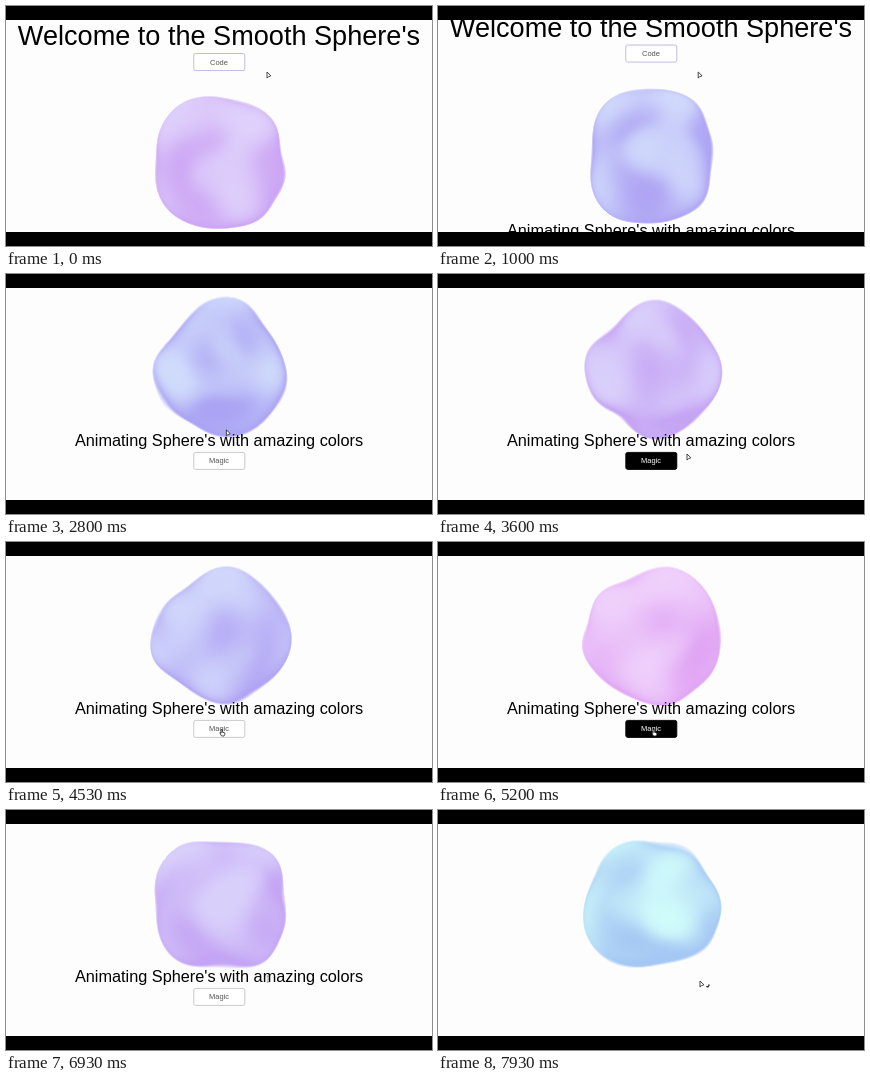
An HTML page with a canvas for the animation above (8000 ms loop, 426 by 240 pixels).

```html
<!DOCTYPE html>
<html lang="en">
<head>
<meta charset="utf-8">
<title>Smooth Spheres</title>
<style>
  html, body { margin: 0; width: 100%; height: 100%; overflow: hidden; background: #fdfdfd; }
  svg, canvas { position: absolute; left: 0; top: 0; display: block; }
  svg { width: 100%; height: 100%; }
  canvas { width: calc(100vw * 160 / 426); height: calc(100vw * 160 / 426); }
  text { font-family: "Liberation Sans", Arial, sans-serif; text-anchor: middle; }
  .btn text { font-size: 7.5px; }
</style>
</head>
<body>
<canvas id="sphere" width="160" height="160"></canvas>
<svg viewBox="0 0 426 240">
  <g id="hero">
    <text x="213" y="39" font-size="27.1">Welcome to the Smooth Sphere's</text>
    <g class="btn">
      <rect x="187.8" y="47.5" width="51" height="17" rx="1.8" fill="#fff" stroke="#bbb6e2" stroke-width=".9"/>
      <text x="213" y="58.5" fill="#555">Code</text>
    </g>
  </g>
  <g id="caption">
    <text x="213" y="172.2" font-size="16.3">Animating Sphere's with amazing colors</text>
    <g class="btn">
      <rect id="face" x="187.8" y="178.4" width="51" height="17" rx="1.8" stroke-width=".9"/>
      <text id="label" x="213" y="189.3">Magic</text>
    </g>
  </g>
  <path d="M0 0h426v14H0zM0 226h426v14H0z"/>
  <g id="pointer" stroke-linejoin="round">
    <path id="arrow" d="M0 0v6l1.5-1.3 2.4-.9z" fill="#fff" stroke="#333" stroke-width=".9"/>
    <path id="busy" d="M6.4 5.2a1.3 1.3 0 0 0 2.2-1.8" fill="none" stroke="#333" stroke-width="1.3"/>
    <path id="hand" d="M-.9-2.5v3.6l-1.2-.4.9 2.3 1 1h2.2l.8-1.4V.9L.4.2v-2.7z" fill="#fff" stroke="#222" stroke-width=".8"/>
    <path id="beam" d="M-1.3-1h2.6M0-1v6M-1.3 5h2.6" stroke="#777" stroke-width=".7"/>
  </g>
</svg>
<script>
const LOOP = 8000, RELOAD = 7500;
const SIZE = 160, RADIUS = 65.5, BUMP = 0.115, BOUND = 1 + BUMP;
const $ = id => document.getElementById(id);
const ctx = $("sphere").getContext("2d");
const pixels = ctx.createImageData(SIZE, SIZE);

const hues = [[0, 270], [2000, 225], [3600, 265], [4530, 250], [5800, 315], [6930, 264], [7930, 214]];
const trail = [
  [900, 261, 66], [1900, 233, 66], [2400, 233, 66], [3000, 216, 187], [3600, 249, 180],
  [4450, 216, 190], [6200, 216, 190], [6930, 262, 167], [7930, 262, 171]
];

const clamp = v => Math.min(1, Math.max(0, v));
const ramp = (t, from, to) => clamp((t - from) / (to - from));
const smooth = u => u * u * (3 - 2 * u);
const mix = (a, b, u) => a + (b - a) * u;
const show = (el, on) => el.setAttribute("visibility", on ? "visible" : "hidden");
const move = (el, x, y) => el.setAttribute("transform", `translate(${x} ${y})`);

// Eased values at time t from rows of [time, ...values]
function follow(keys, t) {
  let i = 0;
  while (i < keys.length - 2 && t >= keys[i + 1][0]) i++;
  const [a, b] = [keys[i], keys[i + 1]];
  const u = smooth(ramp(t, a[0], b[0]));
  return a.slice(1).map((v, k) => mix(v, b[k + 1], u));
}

function hsl(h, s, l) {
  const a = s * Math.min(l, 1 - l);
  return [0, 8, 4].map(n => {
    const k = (n + h / 30) % 12;
    return 255 * (l - a * Math.max(-1, Math.min(k - 3, 9 - k, 1)));
  });
}

// Warped waves over the unit sphere, from -1 to 1
function height(x, y, z, s) {
  const { sin } = Math;
  return (sin(4.2 * x + 1.6 * sin(3 * y + s)) +
          sin(4.2 * y + 1.6 * sin(3 * z + 1.3 * s + 2)) +
          sin(4.2 * z + 1.6 * sin(3 * x - 0.8 * s + 4))) / 3;
}

function gap(x, y, z, s) {
  const d = Math.hypot(x, y, z);
  return d - 1 - BUMP * height(x / d, y / d, z / d, s);
}

// March one ray per pixel onto the bumpy sphere and shade it
function drawSphere(t) {
  const [hue] = follow(hues, t), s = 1 + t / 1100;
  const shade = hsl(hue, 0.78, 0.8);
  const light = hsl(195 + (hue - 225) * 1.45, 0.85, 0.9);
  const { data } = pixels, e = 0.02;
  data.fill(0);
  for (let j = 0; j < SIZE; j++) {
    for (let i = 0; i < SIZE; i++) {
      const x = (i + 0.5 - SIZE / 2) / RADIUS, y = (j + 0.5 - SIZE / 2) / RADIUS;
      const room = BOUND * BOUND - x * x - y * y;
      if (room <= 0) continue;
      let z = Math.sqrt(room), near = 1;
      for (let n = 0; n < 10 && near > 0.004 && z > -0.3; n++) {
        const d = gap(x, y, z, s);
        near = Math.min(near, d);
        z -= d * 0.95;
      }
      const cover = clamp(1.3 - near * RADIUS);
      if (!cover) continue;

      const g = gap(x, y, z, s);
      const nx = gap(x + e, y, z, s) - g, ny = gap(x, y + e, z, s) - g, nz = gap(x, y, z + e, s) - g;
      const facing = (-0.15 * nx - 0.4 * ny + 0.9 * nz) / Math.hypot(nx, ny, nz);
      const rise = (Math.hypot(x, y, z) - 1) / BUMP;
      const lit = smooth(clamp(0.08 + 0.68 * facing + 0.4 * rise));
      const p = 4 * (j * SIZE + i);
      for (let c = 0; c < 3; c++) data[p + c] = mix(shade[c], light[c], lit);
      data[p + 3] = 255 * cover;
    }
  }
  ctx.putImageData(pixels, 0, 0);
}

function drawButton(t) {
  const pulse = (from, to) => ramp(t, from, from + 250) - ramp(t, to, to + 250);
  const on = pulse(2850, 3600) + pulse(4550, 6300);
  const grey = (a, b) => `rgb(${Array(3).fill(Math.round(mix(a, b, on)))})`;
  $("face").setAttribute("fill", grey(255, 0));
  $("face").setAttribute("stroke", grey(196, 0));
  $("label").setAttribute("fill", grey(85, 255));
}

function drawPointer(t) {
  const [x, y] = follow(trail, t);
  const reloading = t >= RELOAD;
  const hand = x > 188 && x < 239 && y > 178 && y < 196;
  const beam = !reloading && !hand && y > 158 && y < 175;
  move($("pointer"), x, y);
  show($("hand"), hand);
  show($("beam"), beam);
  show($("arrow"), !hand && !beam);
  show($("busy"), reloading);
}

function draw(t) {
  const scroll = 1 - (1 - ramp(t, 930, 2520)) ** 3;
  const left = 215 - SIZE / 2, top = mix(158, 95.5, scroll) - SIZE / 2;
  const vw = v => v / 4.26 + "vw";
  $("sphere").style.transform = `translate(${vw(left)}, ${vw(top)})`;
  move($("hero"), 0, -66 * scroll);
  move($("caption"), 0, 66 * (1 - scroll));
  show($("caption"), t < RELOAD);
  drawSphere(t);
  drawButton(t);
  drawPointer(t);
}

const start = performance.now();
function tick() {
  draw((performance.now() - start) % LOOP);
  requestAnimationFrame(tick);
}
tick();
</script>
</body>
</html>
```
